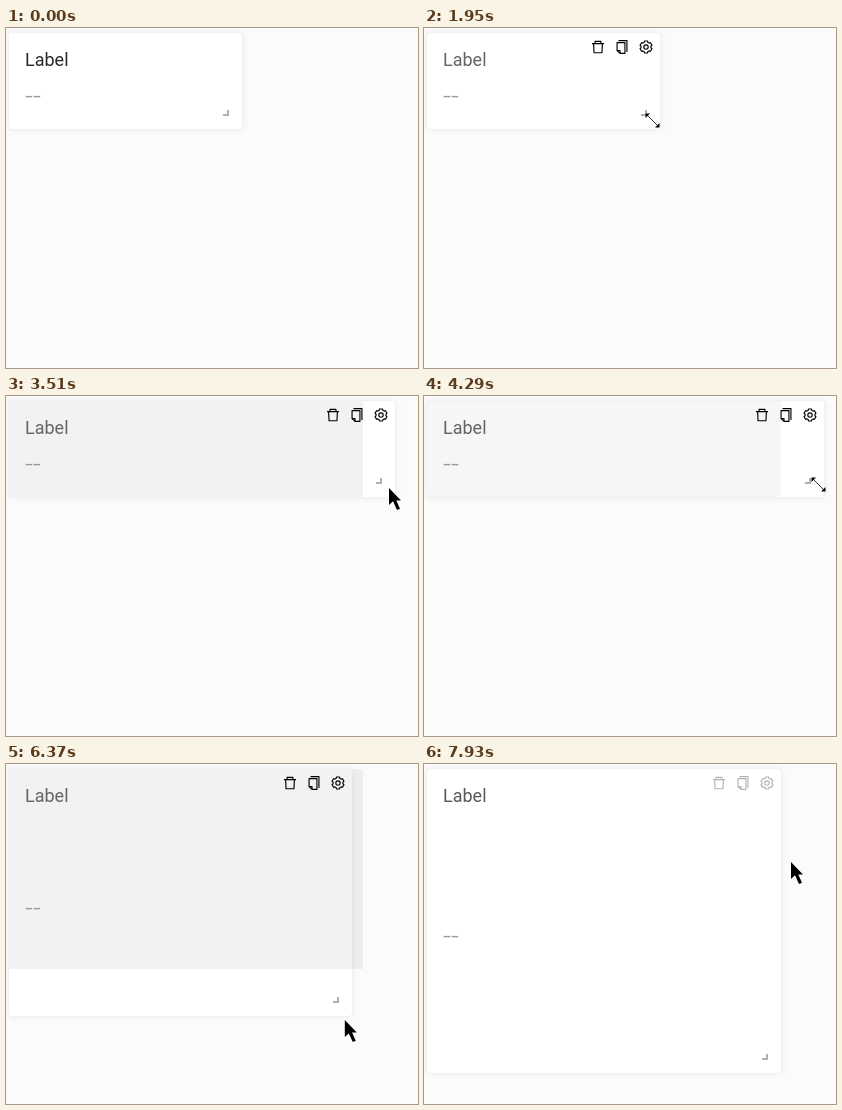
Recreate the animation shown at these times as an HTML page. Size 412 by 340 pixels, loop 8000 ms.

```html
<!DOCTYPE html>
<html lang="en">
<head>
<meta charset="utf-8">
<title>Resizable card</title>
<style>
  html, body { margin: 0; height: 100%; overflow: hidden; background: #fbfbfb; }
  svg { display: block; width: 100%; height: 100%; }
  text { font-family: Roboto, sans-serif; }
  #card { fill: #fff; filter: drop-shadow(0 0 3px rgba(0, 0, 0, .09)); }
  #icons { fill: none; stroke: #000; stroke-width: 1.15; stroke-linejoin: round; }
</style>
</head>
<body>
<svg viewBox="0 0 412 340">
  <rect id="card" x="3" y="5" rx="4"/>
  <rect id="ghost" x="3" y="5" fill="rgb(15,15,60)"/>
  <text id="label" x="19" y="38" font-size="18">Label</text>
  <text id="value" x="19" font-size="28" font-weight="300" fill="#999">--</text>
  <path id="handle" d="M-19-14H-14V-19" fill="none" stroke="#b0b0b0" stroke-width="2"/>
  <g id="icons">
    <path d="M2 4.56H14M5.06 4.5V2.3H10.94V4.5M3.6 4.6L4.05 13.7H11.95L12.4 4.6"/>
    <path transform="translate(24)" d="M4.5 1.56H12.94V13M3.06 3.56H10.94V14.44H6L3.06 11.5ZM3.06 11.5H6V14.4"/>
    <g transform="translate(56 8)"><path id="gear"/><circle r="2.2"/></g>
  </g>
  <path id="arrow" d="M0 0V17L4 13.3L8 22L11 20.7L7.3 12.5H12Z" stroke="#fff" stroke-width="2" paint-order="stroke"/>
  <g id="resize">
    <path d="M-6-6L6 6" stroke="#fff" stroke-width="2.4"/>
    <path d="M-6-6L6 6" stroke="#000" stroke-width=".8"/>
    <path d="M-7-7H-2.5L-7-2.5ZM7 7H2.5L7 2.5Z"/>
  </g>
</svg>
<script>
const LOOP = 8000, STEP = 130;
const LEFT = 3, TOP = 5, GAP = 8, COLUMN = 120.67, ROW = 104;
const MIN_WIDTH = 233, MIN_HEIGHT = 96;
const LAG = 80, SETTLE = 300;
const el = id => document.getElementById(id);

const entry = { x: 398, y: 281 };
const moves = [
  { from: 650, to: 1430, x: 229, y: 77 },
  { from: 1560, to: 1690, x: 228.5, y: 92.5 },
  { from: 1950, to: 2470, x: 235, y: 113 },
  { from: 2600, to: 3160, x: 383, y: 92 },
  { from: 3640, to: 4290, x: 394.5, y: 88.5 },
  { from: 4420, to: 4680, x: 397, y: 94 },
  { from: 4940, to: 5330, x: 350, y: 89.5 },
  { from: 5460, to: 6540, x: 338, y: 268 },
  { from: 7150, to: 7930, x: 367, y: 98 }
];
const drags = [{ from: 2080, to: 4810 }, { from: 5590, to: 6760 }];
const resizeCursor = [{ from: 1690, to: 2080 }, { from: 4160, to: 4550 }, { from: 5330, to: 5590 }];

const clamp = v => Math.min(1, Math.max(0, v));
const progress = (t, from, to) => clamp((t - from) / (to - from));
const ease = k => k * k * (3 - 2 * k);
const mix = (a, b, k) => a + (b - a) * k;
const during = (spans, t) => spans.some(s => t >= s.from && t < s.to);
const snap = (size, cell) => Math.round((size + GAP) / cell) * cell - GAP;
const move = (id, x, y) => el(id).setAttribute("transform", `translate(${x} ${y})`);
const show = (id, visible) => el(id).style.display = visible ? "" : "none";

function pointerAt(t) {
  return moves.reduce((p, m) => {
    const k = ease(progress(t, m.from, m.to));
    return { x: mix(p.x, m.x, k), y: mix(p.y, m.y, k) };
  }, entry);
}

// The card trails the pointer that holds its corner.
function draggedSize(t) {
  const p = pointerAt(t - LAG);
  return {
    width: Math.max(MIN_WIDTH, p.x + 6 - LEFT),
    height: Math.max(MIN_HEIGHT, p.y + 8.5 - TOP)
  };
}

const snapped = ({ width, height }) => ({ width: snap(width, COLUMN), height: snap(height, ROW) });

// Once released, the card settles on the grid.
function cardSize(t) {
  const drag = drags.findLast(d => t >= d.from);
  if (!drag) return snapped({ width: MIN_WIDTH, height: MIN_HEIGHT });
  const held = draggedSize(Math.min(t, drag.to));
  const rest = snapped(held);
  const k = ease(progress(t, drag.to, drag.to + SETTLE));
  return { width: mix(held.width, rest.width, k), height: mix(held.height, rest.height, k) };
}

function setSize(id, { width, height }) {
  el(id).setAttribute("width", Math.round(width));
  el(id).setAttribute("height", Math.round(height));
}

function gearPath() {
  const points = [];
  for (let tooth = 30; tooth < 390; tooth += 60) {
    for (const [offset, radius] of [[-21, 5], [-14, 6.2], [14, 6.2], [21, 5]]) {
      const angle = (tooth + offset) * Math.PI / 180;
      points.push([radius * Math.cos(angle), radius * Math.sin(angle)].map(v => v.toFixed(2)));
    }
  }
  return `M${points.join("L")}Z`;
}

function draw(now) {
  const t = Math.floor(now % LOOP / STEP) * STEP;
  const { x, y } = pointerAt(t);
  const size = cardSize(t);
  const right = LEFT + Math.round(size.width), bottom = TOP + Math.round(size.height);
  const hover = progress(t, 1300, 1690) * (1 - progress(t, 7670, 8040));
  const isResize = during(resizeCursor, t);

  setSize("card", size);
  setSize("ghost", snapped(size));
  show("ghost", during(drags, t));
  el("ghost").setAttribute("opacity", isResize ? .037 : .05);

  const grey = Math.round(mix(42, 100, hover ** .2));
  el("label").setAttribute("fill", `rgb(${grey},${grey},${grey})`);
  el("value").setAttribute("y", 28.5 + Math.round(size.height / 2));
  move("handle", right, bottom);
  move("icons", right - 70, 11);
  el("icons").setAttribute("opacity", hover);

  move("arrow", x, y);
  move("resize", x, y);
  show("arrow", t >= moves[0].from && !isResize);
  show("resize", isResize);
}

function tick() {
  draw(performance.now());
  requestAnimationFrame(tick);
}

el("gear").setAttribute("d", gearPath());
tick();
</script>
</body>
</html>
```
